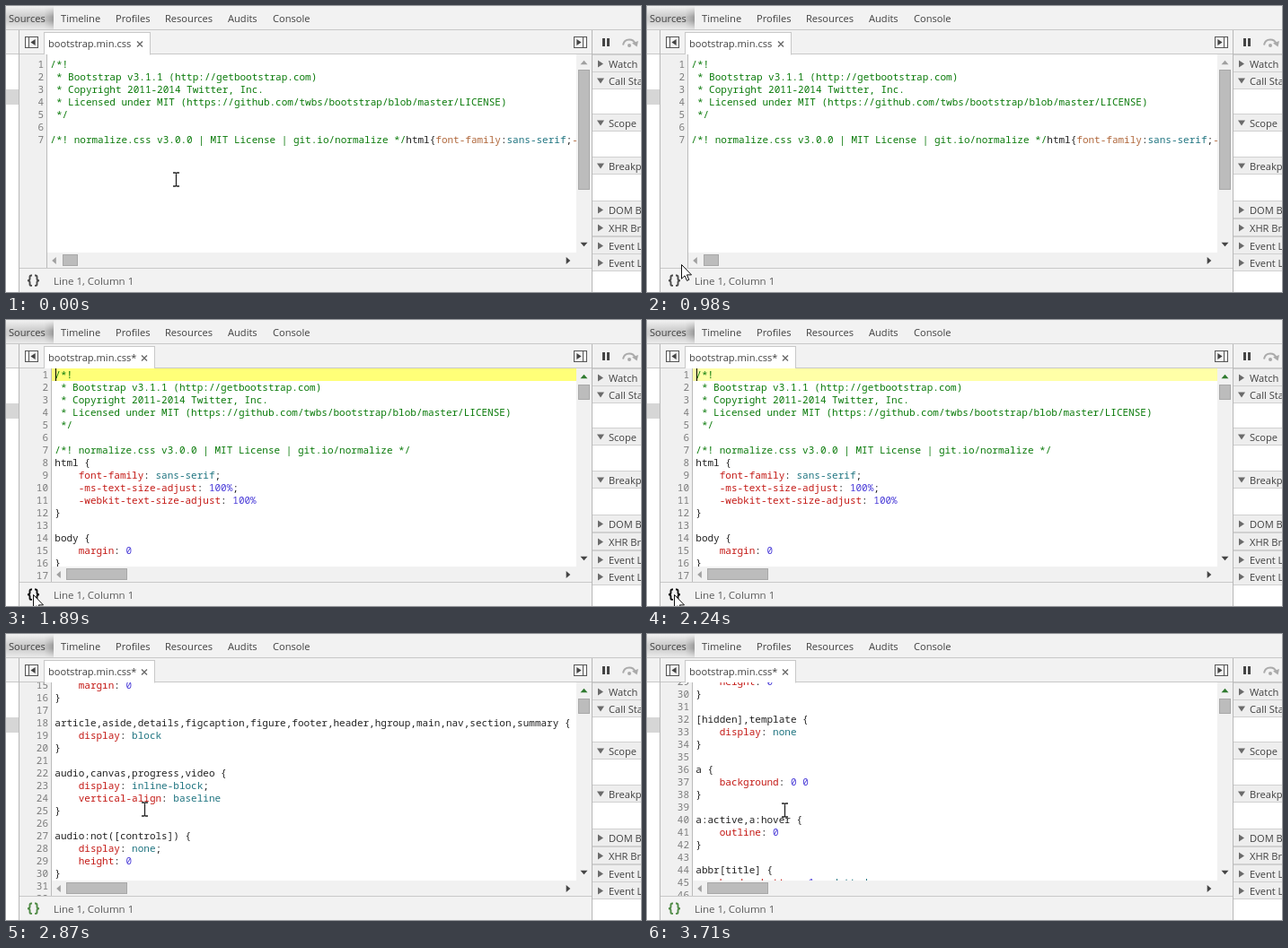
An HTML page that plays this animation: 707x319 px, repeating every 4340 ms.

```html
<!DOCTYPE html>
<html lang="en">
<head>
<meta charset="utf-8">
<title>Pretty print</title>
<style>
html, body { margin: 0; width: 100%; height: 100%; overflow: hidden; background: #fff; }
svg { display: block; width: 707px; height: 319px; }
text { white-space: pre; }
.ui { font: 11.1px "Open Sans", "Noto Sans", sans-serif; fill: #404040; }
.status { font-size: 11.5px; fill: #5a5a5a; }
.code { font: 11px "Noto Sans Mono", "DejaVu Sans Mono", monospace; fill: #222; }
.num { fill: #7c7c7c; text-anchor: end; }
.comment { fill: #0a7a0a; }
.prop { fill: #c41a16; }
.rawprop { fill: #b0683c; }
.atom { fill: #1f7480; }
.number { fill: #4a3cd8; }
</style>
</head>
<body>
<svg id="stage" viewBox="0 0 707 319">
  <defs>
    <linearGradient id="tabShade">
      <stop offset="0" stop-color="#cfcfcf"/>
      <stop offset=".8" stop-color="#c8c8c8"/>
      <stop offset="1" stop-color="#9a9a9a"/>
    </linearGradient>
    <linearGradient id="fade" x2="0" y2="1">
      <stop offset="0" stop-color="#f2f2f2"/>
      <stop offset=".45" stop-color="#f2f2f2" stop-opacity="0"/>
      <stop offset=".6" stop-color="#f2f2f2" stop-opacity="0"/>
      <stop offset="1" stop-color="#f2f2f2" stop-opacity=".9"/>
    </linearGradient>
    <clipPath id="textClip"><rect x="15" y="54" width="620" height="221"/></clipPath>
    <clipPath id="gutterClip"><rect x="15" y="54" width="36" height="238"/></clipPath>
  </defs>
  <g id="frame"></g>
  <g id="raw"></g>
  <g id="pretty"></g>
  <g id="braces" fill="none" stroke-width="1.9">
    <path d="M29 300.5h-.8q-1.7 0-1.7 1.7v2q0 2-2.5 2q2.5 0 2.5 2v2q0 1.7 1.7 1.7h.8"/>
    <path d="M32 300.5h.8q1.7 0 1.7 1.7v2q0 2 2.5 2q-2.5 0-2.5 2v2q0 1.7-1.7 1.7h-.8"/>
  </g>
  <path id="beam" d="M-3.5-7.5h2.6L0-6.8l.9-.7h2.6M0-7V7M-3.5 7.5h2.6L0 6.8l.9.7h2.6" fill="none" stroke-width="1.3"/>
  <path id="arrow" d="M.5.5V16.2L4.1 12.8 6.5 18.4 8.8 17.4 6.4 11.9H11.5Z" fill="#fff" stroke="#111"/>
</svg>
<script>
const NS = "http://www.w3.org/2000/svg";
const LOOP = 4340, STEP = 70, FORMAT_AT = 1890, FLASH_MS = 1000;
const BAR = "#f2f2f2", TRACK = "#f1f1f1";
const $ = id => document.getElementById(id);

function add(parent, tag, attrs, content) {
  const el = document.createElementNS(NS, tag);
  for (const k in attrs) el.setAttribute(k, attrs[k]);
  if (content) el.textContent = content;
  parent.appendChild(el);
  return el;
}
const box = (p, x, y, width, height, fill, more) => add(p, "rect", { x, y, width, height, fill, ...more });
const path = (p, d, fill, more) => add(p, "path", { d, fill, ...more });
const label = (p, x, y, s, cls = "") => add(p, "text", { x, y, class: "ui " + cls }, s);

function triangle(p, x, y, dir, fill, half = 4, depth = 3) {
  const turn = { right: 0, down: 90, left: 180, up: 270 }[dir];
  path(p, `M${-depth} ${-half}L${depth} 0L${-depth} ${half}Z`, fill,
    { transform: `translate(${x} ${y}) rotate(${turn})` });
}
const scrollArrow = (p, x, y, dir, fill) => triangle(p, x, y, dir, fill, 4, 2.3);

function panelIcon(p, x, flip) {
  const g = add(p, "g", { transform: `translate(${x} 34)` + (flip ? " translate(15 0) scale(-1 1)" : "") });
  box(g, .5, .5, 14, 12, "none", { stroke: "#555" });
  path(g, "M4.5 1V12", "none", { stroke: "#555" });
  triangle(g, 9, 6.5, "left", "#444", 3.5, 2.6);
}

function drawFrame(p) {
  box(p, 0, 0, 707, 319, "#fff");
  box(p, 0, 0, 707, 54, BAR);
  box(p, 0, 0, 53, 27, "url(#tabShade)");
  box(p, 0, 0, 53, 27, "url(#fade)");
  box(p, 0, 26, 707, 1, "#c8c8c8");
  [[3, "Sources"], [61, "Timeline"], [122, "Profiles"], [177, "Resources"], [247, "Audits"], [297, "Console"]]
    .forEach(([x, s]) => label(p, x, 18, s));

  box(p, 0, 53, 707, 1, "#c8c8c8");
  box(p, 0, 93, 14, 17, "#d6d6d6");
  box(p, 14, 27, 1, 292, "#b8b8b8");
  panelIcon(p, 21, false);
  panelIcon(p, 632, true);

  box(p, 15, 292, 637, 27, BAR);
  box(p, 15, 292, 637, 1, "#c8c8c8");
  label(p, 53, 311, "Line 1, Column 1", "status");

  // debugger sidebar
  box(p, 664, 36, 3, 9, "#444");
  box(p, 669, 36, 3, 9, "#444");
  path(p, "M687 43.5Q688 37.5 694 37.5Q699 37.5 700.5 42", "none", { stroke: "#aaa", "stroke-width": 2 });
  path(p, "M697 41.5L704 39L702.5 45.5Z", "#aaa");
  add(p, "circle", { cx: 694, cy: 44, r: 2, fill: "#aaa" });
  [[55, "Watch"], [74, "Call Stack", 1], [121, "Scope", 1], [169, "Breakpoints", 1],
   [218, "DOM Breakpoints"], [238, "XHR Breakpoints"], [258, "Event Listener Breakpoints"],
   [277, "Event Listeners"]].forEach(([y, s, open]) => {
    box(p, 653, y - 1, 54, 20, "#eee");
    box(p, 653, y - 1, 54, 1, "#d0d0d0");
    box(p, 653, y + 18, 54, 1, "#d0d0d0");
    triangle(p, 662, y + 9.5, open ? "down" : "right", "#6a6a6a");
    label(p, 671, y + 14, s);
  });
  box(p, 652, 27, 1, 292, "#b8b8b8");
}

function drawChrome(p, o) {
  box(p, 42.5, 29.5, o.tabEnd - 42, 24.5, "#fff", { stroke: "#c8c8c8" });
  box(p, 43, 53, o.tabEnd - 43, 2, "#fff");
  label(p, 47, 46, o.title);
  const x = o.tabEnd - 11;
  path(p, `M${x - 3} 39.5l6 6m0-6l-6 6`, "none", { stroke: "#6a6a6a", "stroke-width": 1.4 });

  box(p, 635, 54, 17, 238, TRACK);
  box(p, o.gutter + 1, 275, 634 - o.gutter, 17, TRACK);
  box(p, 637.5, o.thumbY + .5, 12, o.thumbH - 1, "#bcbcbc", { stroke: "#a8a8a8" });
  box(p, o.thumbX + .5, 277.5, o.thumbW - 1, 12, "#bcbcbc", { stroke: "#a8a8a8" });
  scrollArrow(p, 643.5, 63, "up", o.upColor);
  scrollArrow(p, 643.5, 266, "down", "#444");
  scrollArrow(p, o.gutter + 8.5, 284, "left", "#a0a0a0");
  scrollArrow(p, 626, 284, "right", "#444");
  box(p, 15, 54, o.gutter - 15, 238, "#f0f0f0");
  box(p, o.gutter, 54, 1, 238, "#bbb");
}

const HEAD = `/*!
 * Bootstrap v3.1.1 (http://getbootstrap.com)
 * Copyright 2011-2014 Twitter, Inc.
 * Licensed under MIT (https://github.com/twbs/bootstrap/blob/master/LICENSE)
 */

/*! normalize.css v3.0.0 | MIT License | git.io/normalize */`;

const RULES = [
  ["html", "font-family: sans-serif", "-ms-text-size-adjust: 100%", "-webkit-text-size-adjust: 100%"],
  ["body", "margin: 0"],
  ["article,aside,details,figcaption,figure,footer,header,hgroup,main,nav,section,summary", "display: block"],
  ["audio,canvas,progress,video", "display: inline-block", "vertical-align: baseline"],
  ["audio:not([controls])", "display: none", "height: 0"],
  ["[hidden],template", "display: none"],
  ["a", "background: 0 0"],
  ["a:active,a:hover", "outline: 0"],
  ["abbr[title]", "border-bottom: 1px dotted"],
  ["b,strong", "font-weight: 700"]
];

const headLines = HEAD.split("\n").map(s => [["comment", s]]);

function declaration(s, last) {
  const [name, value] = s.split(": ");
  const parts = [["", "    "], ["prop", name], ["", ": "]];
  value.split(/( )/).forEach(v => parts.push([/^\d/.test(v) ? "number" : "atom", v]));
  if (!last) parts.push(["", ";"]);
  return parts;
}

const prettyLines = [...headLines];
RULES.forEach(([selector, ...decls]) => {
  prettyLines.push([["", selector + " {"]]);
  decls.forEach((d, i) => prettyLines.push(declaration(d, i === decls.length - 1)));
  prettyLines.push([["", "}"]], []);
});

const rawLines = headLines.slice(0, 6).concat([[
  ...headLines[6], ["", "html{"], ["rawprop", "font-family"], ["", ":"], ["atom", "sans-serif"], ["", ";"],
  ["rawprop", "-ms-text-size-adjust"]
]]);

function drawLines(p, lines, gutter, top) {
  const nums = add(add(p, "g", { "clip-path": "url(#gutterClip)" }), "g");
  const body = add(add(p, "g", { "clip-path": "url(#textClip)" }), "g");
  const flash = box(body, gutter + 1, top, 634 - gutter, 14, "none");
  lines.forEach((parts, i) => {
    const y = top + 11 + 14 * i;
    add(nums, "text", { x: gutter - 3, y, class: "code num" }, String(i + 1));
    const line = add(body, "text", { x: gutter + 4.3, y, class: "code" });
    parts.forEach(([cls, s]) => add(line, "tspan", { class: cls }, s));
  });
  const caret = box(body, gutter + 5, top, 1, 14, "#000");
  return { nums, body, flash, caret };
}

drawFrame($("frame"));
drawChrome($("raw"), { tabEnd: 160, title: "bootstrap.min.css", gutter: 45, upColor: "#a0a0a0",
  thumbY: 71, thumbH: 134, thumbX: 63, thumbW: 17 });
drawChrome($("pretty"), { tabEnd: 165, title: "bootstrap.min.css*", gutter: 50, upColor: "#2f7a2f",
  thumbY: 72, thumbH: 17, thumbX: 67, thumbW: 68 });
const raw = drawLines($("raw"), rawLines, 45, 58);
const pretty = drawLines($("pretty"), prettyLines, 50, 54);

// pointer legs: start time, number of steps, destination
const LEGS = [
  [70, 1, 166, 206], [280, 8, 70, 267], [840, 3, 38, 288], [1050, 4, 30, 306],
  [2310, 4, 156, 201], [2730, 1, 154, 195], [3710, 1, 153, 196]
];
const SCROLLS = [2590, 2870, 3010, 3710];

function pointer(t) {
  let x = 189, y = 193;
  for (const [start, n, toX, toY] of LEGS) {
    if (t < start) break;
    const k = Math.min(n, Math.floor((t - start) / STEP) + 1) / n;
    x += (toX - x) * k;
    y += (toY - y) * k;
  }
  return [Math.round(x), Math.round(y)];
}

const show = (el, on) => el.setAttribute("visibility", on ? "inherit" : "hidden");

function render(t) {
  const formatted = t >= FORMAT_AT;
  show($("raw"), !formatted);
  show($("pretty"), formatted);
  show(raw.caret, t >= 1470 && t < 1540);

  const scroll = 100 * SCROLLS.filter(s => t >= s).length;
  for (const g of [pretty.nums, pretty.body]) g.setAttribute("transform", `translate(0 ${-scroll})`);
  const age = Math.max(0, Math.floor((t - FORMAT_AT) / STEP) * STEP) / FLASH_MS;
  pretty.flash.setAttribute("fill", `rgb(255,255,${Math.round(120 + 135 * Math.min(1, age))})`);

  const [x, y] = pointer(t);
  const isArrow = y > 275;
  show($("arrow"), isArrow);
  show($("beam"), !isArrow);
  $("arrow").setAttribute("transform", `translate(${x} ${y})`);
  $("beam").setAttribute("transform", `translate(${x + .5} ${y + .5})`);
  $("beam").setAttribute("stroke", t >= 2590 && t < 2730 ? "#45b545" : "#222");
  const hover = isArrow && y > 292 && x < 40;
  $("braces").setAttribute("stroke", hover ? "#111" : formatted ? "#4f8a45" : "#4a4a4a");
}

const begin = performance.now();
function tick() {
  render((performance.now() - begin) % LOOP);
  requestAnimationFrame(tick);
}
tick();
</script>
</body>
</html>
```
